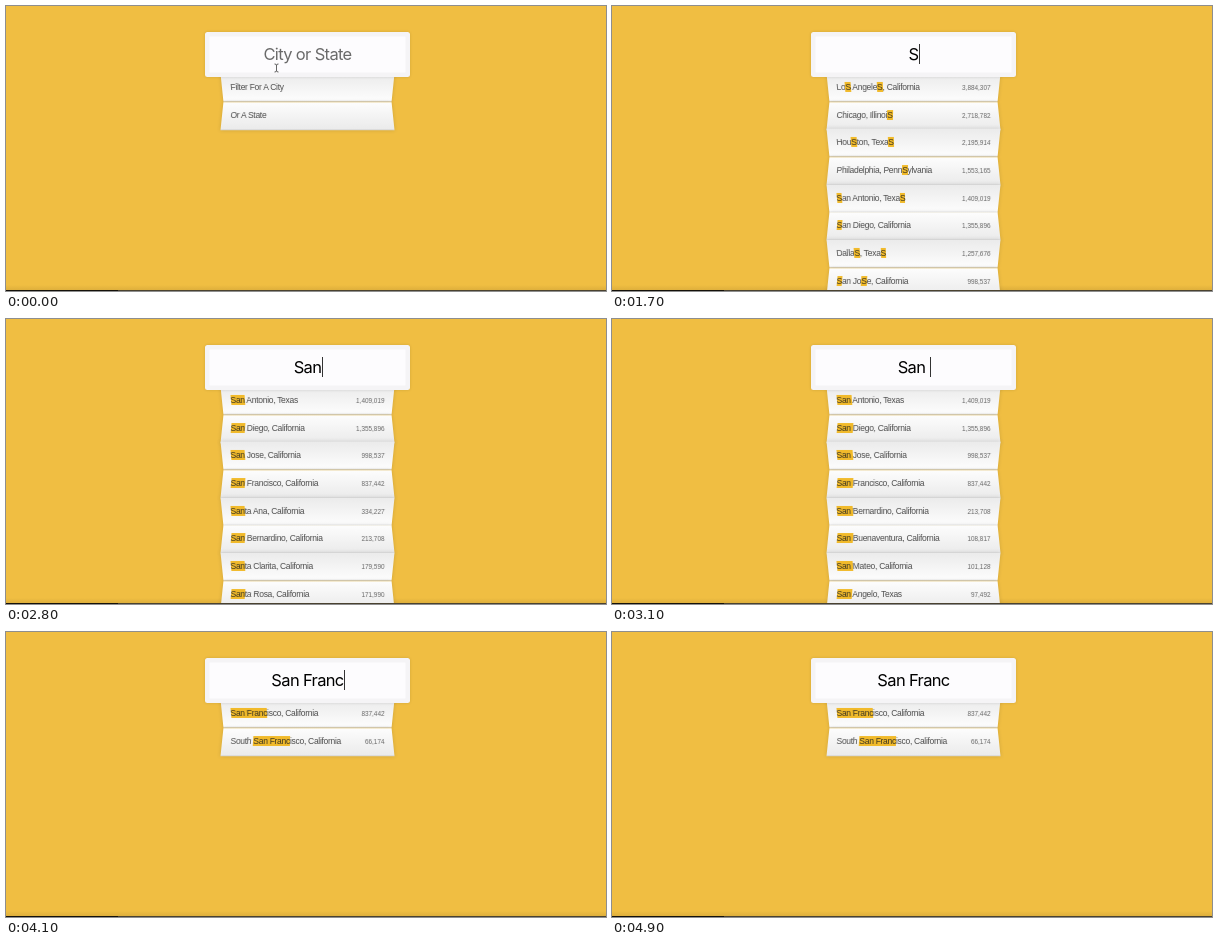
An HTML page that plays this animation: 600 by 285 pixels, repeating every 5000 ms.

```html
<!DOCTYPE html>
<html lang="en">
<head>
<meta charset="utf-8">
<title>City filter</title>
<style>
  html, body { margin: 0; width: 100%; height: 100%; overflow: hidden; }
  body { position: relative; background: #f0be42; font-family: "Liberation Sans", Arial, sans-serif; }
  #stage { position: absolute; left: 0; top: 0; width: 600px; height: 285px; overflow: hidden; }
  #field {
    position: absolute; left: 199px; top: 26px; width: 205px; height: 45px; box-sizing: border-box;
    border: 4.5px solid #f5f4f6; border-radius: 2.5px; background: #fdfcfe;
    box-shadow: 0 0 3px rgba(0,0,0,.14), inset 0 0 1px rgba(0,0,0,.16);
    font: 16.5px/36px Inter, sans-serif; letter-spacing: -.65px;
    text-align: center; white-space: pre; color: #000;
  }
  #field.blank { color: #6a6a6a; }
  #typed { position: relative; }
  #caret { position: absolute; width: 1px; height: 20px; top: 8px; background: #333; }
  .row {
    position: absolute; left: 216px; width: 171px; height: 27.65px; box-sizing: border-box; padding: 0 8.5px;
    display: flex; justify-content: space-between; align-items: center;
    box-shadow: 0 0 4px rgba(0,0,0,.14); border-bottom: .5px solid #d8d8d8;
    font-size: 8.5px; letter-spacing: -.29px; color: #4c4c4c; white-space: pre;
  }
  .row.odd { transform: perspective(43px) rotateX(-3deg); background: linear-gradient(#ebebeb, #fdfdfd); }
  .row.even { transform: perspective(43px) rotateX(3deg); background: linear-gradient(#fdfdfd, #ebebeb); }
  .hit { background: #f1ba2b; color: #3a3420; }
  .count { font-size: 6.4px; letter-spacing: 0; color: #666; }
  #pointer { position: absolute; left: 267px; top: 57px; }
  #shade { position: absolute; left: 0; top: 279px; width: 600px; height: 5px; background: linear-gradient(transparent, rgba(70,45,0,.1)); }
  #edge { position: absolute; left: 0; top: 284px; width: 600px; height: 1px; background: linear-gradient(90deg, #14110a 112px, #4a4230 112px); }
</style>
</head>
<body>
<div id="stage">
  <div id="shade"></div>
  <div id="list"></div>
  <div id="field"><span id="typed"></span><i id="caret"></i></div>
  <svg id="pointer" width="7" height="10" fill="none" stroke="#555" stroke-width=".9">
    <path d="M1.5 1Q3.5 1 3.5 2.2Q3.5 1 5.5 1M3.5 2V8M1.5 9Q3.5 9 3.5 7.8Q3.5 9 5.5 9"/>
  </svg>
  <div id="edge"></div>
</div>
<script>
const LOOP = 5000, ROW_TOP = 68, ROW_HEIGHT = 27.65, MAX_ROWS = 8;

const cities = [
  ['Los Angeles, California', '3,884,307'],
  ['Chicago, Illinois', '2,718,782'],
  ['Houston, Texas', '2,195,914'],
  ['Philadelphia, Pennsylvania', '1,553,165'],
  ['San Antonio, Texas', '1,409,019'],
  ['San Diego, California', '1,355,896'],
  ['Dallas, Texas', '1,257,676'],
  ['San Jose, California', '998,537'],
  ['San Francisco, California', '837,442'],
  ['Sacramento, California', '479,686'],
  ['Kansas City, Missouri', '467,007'],
  ['Mesa, Arizona', '457,587'],
  ['Wichita, Kansas', '386,552'],
  ['Santa Ana, California', '334,227'],
  ['San Bernardino, California', '213,708'],
  ['Santa Clarita, California', '179,590'],
  ['Santa Rosa, California', '171,990'],
  ['San Buenaventura, California', '108,817'],
  ['San Mateo, California', '101,128'],
  ['San Angelo, Texas', '97,492'],
  ['South San Francisco, California', '66,174']
];
const hints = [['Filter For A City', ''], ['Or A State', '']];

// [start ms, typed text, filter applied on key release, caret visible]
const steps = [
  [0, '', '', false],
  [900, '', '', true],
  [1400, 'S', '', true],
  [1700, 'S', 'S', true],
  [1800, 'Sa', 'S', true],
  [1900, 'San', 'Sa', true],
  [2000, 'San', 'San', true],
  [2300, 'San', 'San', false],
  [2800, 'San', 'San', true],
  [2900, 'San ', 'San', true],
  [3000, 'San ', 'San ', true],
  [3200, 'San F', 'San ', true],
  [3300, 'San F', 'San F', true],
  [3400, 'San Fr', 'San F', true],
  [3500, 'San Fra', 'San Fra', true],
  [3600, 'San Fran', 'San Fra', true],
  [3700, 'San Fran', 'San Fran', true],
  [4000, 'San Franc', 'San Fran', true],
  [4100, 'San Franc', 'San Franc', true],
  [4200, 'San Francs', 'San Franc', true],
  [4300, 'San Francs', 'San Francs', true],
  [4800, 'San Franc', 'San Francs', false],
  [4900, 'San Franc', 'San Franc', false]
];

const [list, field, typed, caret, pointer] =
  ['list', 'field', 'typed', 'caret', 'pointer'].map(id => document.getElementById(id));

function rowHtml([name, count], index, pattern, query) {
  const label = query ? name.replace(pattern, `<span class="hit">${query}</span>`) : name;
  const side = index % 2 ? 'even' : 'odd';
  return `<div class="row ${side}" style="top:${ROW_TOP + index * ROW_HEIGHT}px">` +
    `<span>${label}</span><span class="count">${count}</span></div>`;
}

function showList(query) {
  const pattern = new RegExp(query, 'gi');
  const found = query ? cities.filter(([name]) => name.search(pattern) >= 0) : hints;
  list.innerHTML = found.slice(0, MAX_ROWS)
    .map((item, i) => rowHtml(item, i, pattern, query)).join('');
}

function showField(text, caretOn) {
  field.className = text ? '' : 'blank';
  typed.textContent = text || 'City or State';
  const inner = field.clientWidth;
  const end = text ? (inner + typed.getBoundingClientRect().width) / 2 : inner / 2;
  caret.style.left = Math.round(end - .5) + .5 + 'px';
  caret.style.display = caretOn ? 'block' : 'none';
}

let shown = null;
function draw(now) {
  const time = now % LOOP;
  const step = steps.filter(([start]) => start <= time).pop();
  if (step !== shown) {
    const [, text, query, caretOn] = step;
    showList(query);
    showField(text, caretOn);
    pointer.style.display = text ? 'none' : 'block';
    shown = step;
  }
}

const begin = performance.now();
function tick() {
  draw(performance.now() - begin);
  requestAnimationFrame(tick);
}
tick();
</script>
</body>
</html>
```
